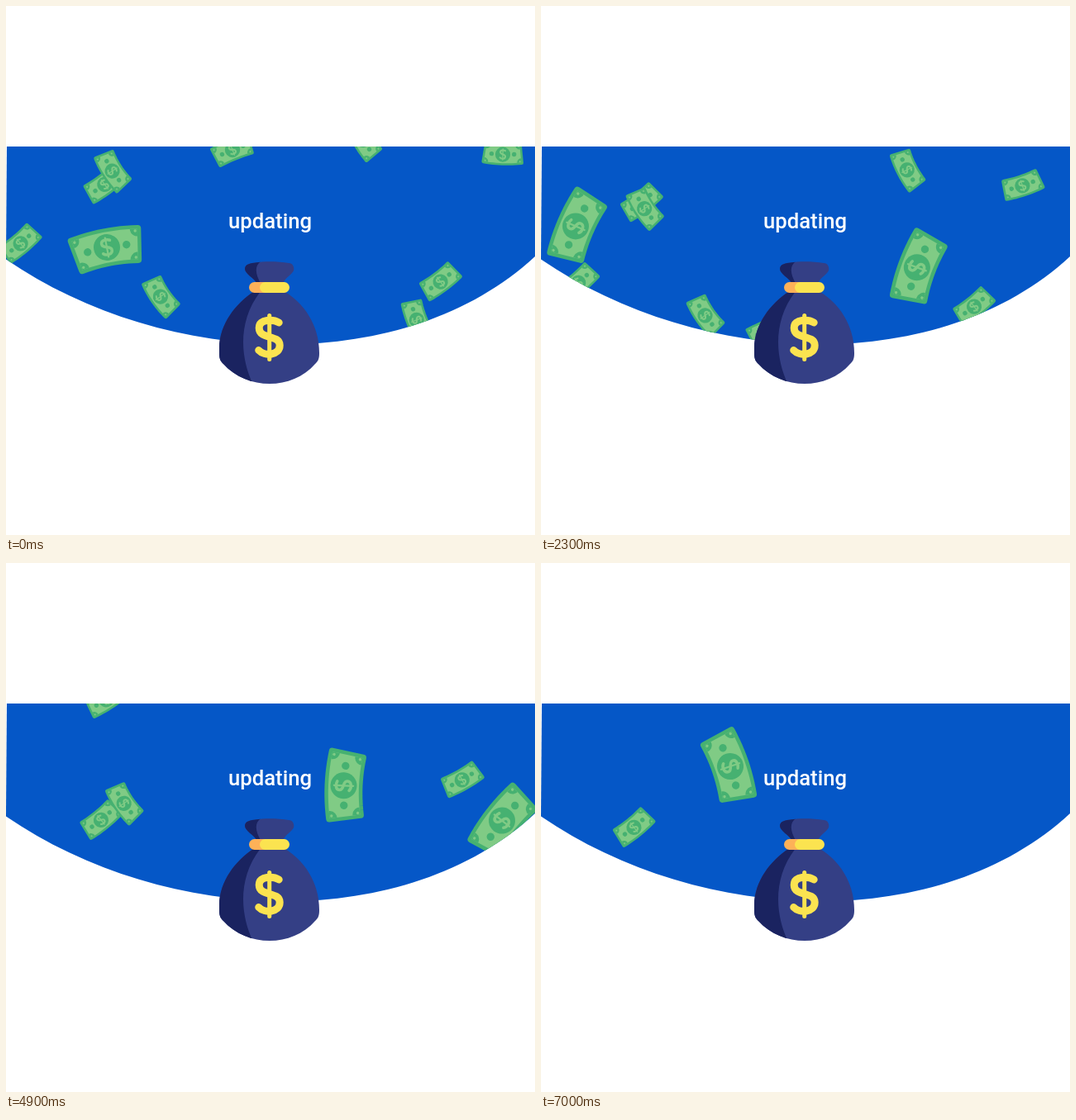
An HTML page with a canvas that plays this animation: 640x640 px, repeating every 7100 ms.

```html
<!DOCTYPE html>
<html>
<head>
<meta charset="utf-8">
<style>
  html, body { margin: 0; width: 100%; height: 100%; overflow: hidden; background: #fff; }
  canvas { display: block; }
</style>
</head>
<body>
<canvas id="stage" width="640" height="640"></canvas>
<script>
const ctx = document.getElementById('stage').getContext('2d');
const LOOP = 7100, STEP = 100;
const BLUE = '#0557c7', GREEN = '#46b171', MINT = '#80cb85';
const NAVY = '#1a2360', INDIGO = '#343f85', YELLOW = '#fbe350', ORANGE = '#fdb158';

const sky = new Path2D('M1 170H640V303C480 451 190 437 0 306.500Z');
const sack = new Path2D('M299 346C278 360 258 385 258 414V420C258 428 260 430 263 433C292 465 346 465 374 433C377 430 379 428 379 420C379 385 360 360 338 346Z');
const sackShade = new Path2D('M309 344C280 380 283 425 299 458H250V344Z');
const tuft = new Path2D('M304 336C300 329 289 324 289 318C289 312 297 311 302 310.500C313 308.500 330 309 342 311C347 311 349 316 348 320C346 325 338 328 335 336Z');
const tuftShade = new Path2D('M314 306C300 311 300 322 309 337H285V306Z');
const dollarS = new Path2D('M11.500 -18C5 -22 -12.500 -23 -12.500 -11.500C-12.500 3 12.500 -4 12.500 9.500C12.500 22 -6 23 -13 15.500');
const dollarBar = new Path2D('M0 -26.500V26.500');

// A bill passes x, y at its birth (seconds), then drifts, sways, falls and settles at its tilt.
const bill = options => ({
  size: 0.57, bend: -290, births: [0], drift: 0, sway: 0, phase: 0, gain: 0, turn: 0, spin: 0, ...options
});
const bigBill = (birth, x, y, tilt, speed, more) =>
  bill({ size: 1, bend: 225, spin: -25, births: [birth], x, y, tilt, speed, ...more });

const waves = [-2.6, -0.6, 1.1, 3.1];
const bills = [
  bigBill(0, 122, 292, -11, 79, { drift: -23 }),
  bigBill(1.4, 52, 193, -44, 69, { sway: 12, phase: -2.8, gain: 14 }),
  bigBill(1.4, 481, 193, -47, 137, { drift: -29 }),
  bigBill(4.1, 600, 210, -32, 127),
  bigBill(5.6, 398, 417, -105, 211, { drift: -15 }),
  bigBill(7, 229, 246, 71, 211, { drift: 20 }),
  bill({ births: waves.map(t => t + 2), x: 128.5, drift: -12, sway: 10, phase: -1.4, y: 177, speed: 60, gain: 8, tilt: -40, turn: 6 }),
  bill({ births: waves, x: -10, drift: 46, y: 240, speed: 79, tilt: -40 }),
  bill({ births: waves, x: 603, drift: -25, sway: 14, y: 149, speed: 45, gain: 10, tilt: -43, turn: 82 }),
  bill({ births: [-1.8, 0, 2], bend: -215, x: 432, drift: 36, y: 162, speed: 121, tilt: 70, turn: -10 }),
  bill({ bend: 380, x: 266, drift: 4, sway: 8, phase: 1.6, y: 174, speed: 95, tilt: -22 }),
  bill({ births: waves, bend: -200, x: 114, drift: 23, sway: 18, phase: 1.9, y: 154, speed: 76, tilt: 55, turn: 4 })
];

function disc(x, y, r, color) {
  ctx.fillStyle = color;
  ctx.beginPath();
  ctx.arc(x, y, r, 0, 7);
  ctx.fill();
}

function dollar(x, y, scale, color, weight, bar) {
  ctx.save();
  ctx.translate(x, y);
  ctx.scale(scale, scale);
  ctx.strokeStyle = color;
  ctx.lineCap = 'round';
  ctx.lineWidth = weight;
  ctx.stroke(dollarS);
  ctx.lineWidth = bar;
  ctx.stroke(dollarBar);
  ctx.restore();
}

function drawBill(b, age) {
  const curve = (u, v) => [
    (b.bend - v) * Math.sin(u / b.bend),
    b.bend - (b.bend - v) * Math.cos(u / b.bend)
  ];
  const sheet = (w, h) => {
    const path = new Path2D();
    for (let i = -6; i <= 6; i++) path.lineTo(...curve(w * i / 6, -h));
    for (let i = 6; i >= -6; i--) path.lineTo(...curve(w * i / 6, h));
    path.closePath();
    return path;
  };
  const corners = (w, h, r, color) => {
    for (const i of [-1, 1]) for (const j of [-1, 1]) disc(...curve(i * w, j * h), r, color);
  };
  const angle = b.tilt + b.turn * Math.exp(-age) + b.spin * age;

  ctx.save();
  ctx.translate(
    b.x + b.drift * age + b.sway * Math.sin(2 * age + b.phase),
    b.y + b.speed * age + b.gain * age * age
  );
  ctx.rotate(angle * Math.PI / 180);
  ctx.scale(b.size, b.size);

  const paper = sheet(38, 19), inside = sheet(37.5, 18.5);
  ctx.lineJoin = 'round';
  ctx.lineWidth = 8;
  ctx.strokeStyle = ctx.fillStyle = GREEN;
  ctx.fill(paper);
  ctx.stroke(paper);
  ctx.fillStyle = MINT;
  ctx.fill(inside);
  ctx.save();
  ctx.clip(inside);
  corners(37.5, 18.5, 9, GREEN);
  ctx.restore();
  corners(35, 16, 1.7, MINT);
  for (const u of [-24, 24]) disc(...curve(u, 0), 4.7, GREEN);
  disc(0, 0, 16, GREEN);
  dollar(0, 0, 0.44, MINT, 8, 5);
  ctx.restore();
}

function shaded(shape, shade) {
  ctx.fillStyle = INDIGO;
  ctx.fill(shape);
  ctx.save();
  ctx.clip(shape);
  ctx.fillStyle = NAVY;
  ctx.fill(shade);
  ctx.restore();
}

function pill(x, width, color) {
  ctx.fillStyle = color;
  ctx.beginPath();
  ctx.roundRect(x, 334, width, 13, 6.5);
  ctx.fill();
}

function drawBag() {
  shaded(sack, sackShade);
  shaded(tuft, tuftShade);
  pill(294, 30, ORANGE);
  pill(307, 36, YELLOW);
  dollar(318.7, 401, 1, YELLOW, 9, 5);
}

function frame(now) {
  const t = Math.floor(now % LOOP / STEP) * STEP / 1000;
  ctx.fillStyle = '#fff';
  ctx.fillRect(0, 0, 640, 640);
  ctx.save();
  ctx.fillStyle = BLUE;
  ctx.fill(sky);
  ctx.clip(sky);
  for (const b of bills)
    for (const birth of b.births) drawBill(b, t - birth);
  ctx.restore();

  ctx.fillStyle = '#fff';
  ctx.font = '500 25.7px Roboto, sans-serif';
  ctx.textAlign = 'center';
  ctx.fillText('updating', 319.5, 269);
  drawBag();
  requestAnimationFrame(frame);
}
requestAnimationFrame(frame);
</script>
</body>
</html>
```
